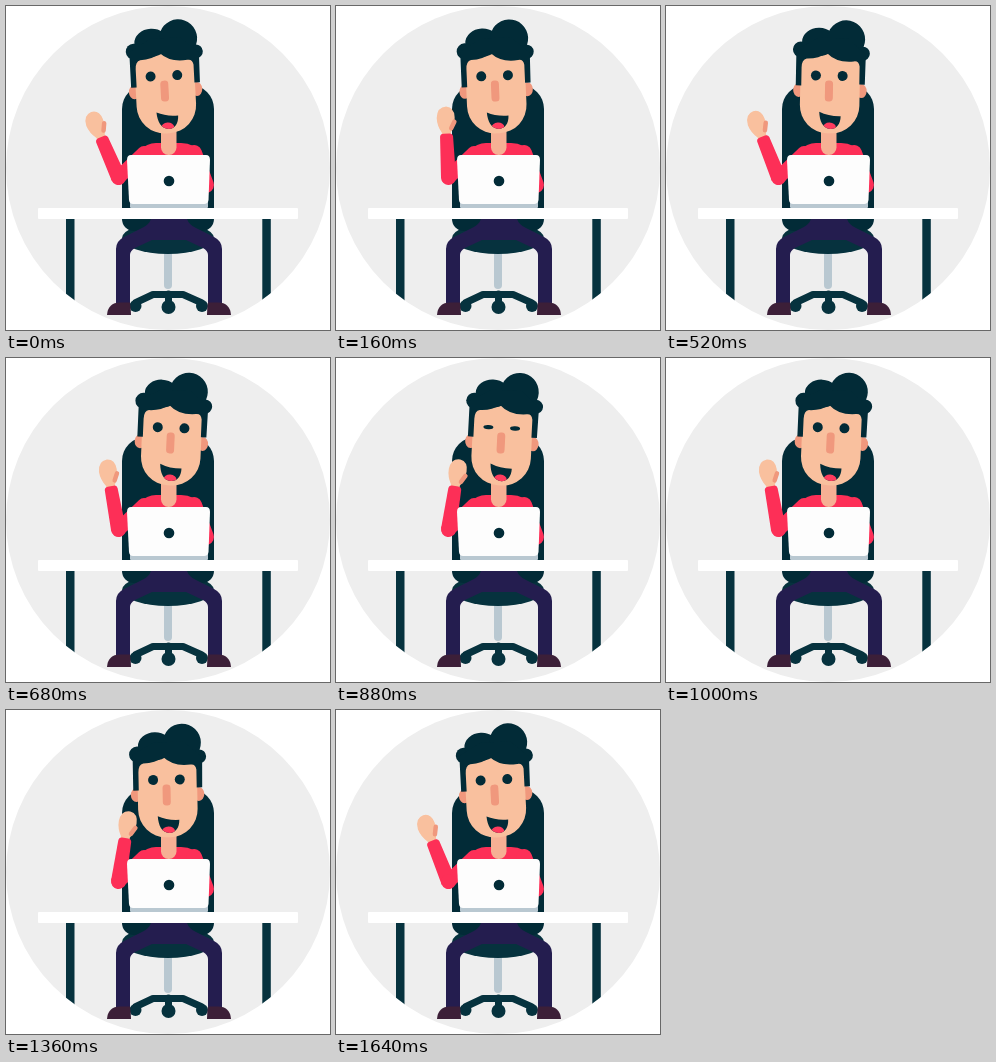
Recreate the animation shown at these times as an HTML page with a canvas. Size 324x324 px, loop 1680 ms.

```html
<!DOCTYPE html>
<html lang="en">
<head>
<meta charset="utf-8">
<title>Waving at the desk</title>
<style>
  html, body { margin: 0; width: 100%; height: 100%; overflow: hidden; background: #fff; }
  canvas { display: block; width: 100vw; height: 100vh; }
</style>
</head>
<body>
<canvas id="stage"></canvas>
<script>
const SIZE = 324, LOOP = 1680, STEP = 40, WAVES = 3;
const C = {
  back: '#eeeeee', dark: '#022b37', metal: '#06323e', skin: '#f9c09e', neck: '#f6b094',
  shade: '#f0987d', red: '#fd2f57', pants: '#241d4f', shoe: '#3c1f38', steel: '#b9c8d1',
  shell: '#fdfdfd', white: '#fff', tongue: '#ff3b5e'
};
const canvas = document.getElementById('stage');
const ctx = canvas.getContext('2d');

function resize() {
  const ratio = window.devicePixelRatio || 1;
  canvas.width = Math.round(innerWidth * ratio);
  canvas.height = Math.round(innerHeight * ratio);
}

function shape(path, color) {
  ctx.fillStyle = color;
  ctx.fill(new Path2D(path));
}

function box(x, y, w, h, r, color) {
  ctx.fillStyle = color;
  ctx.beginPath();
  ctx.roundRect(x, y, w, h, r);
  ctx.fill();
}

function oval(x, y, rx, ry, color) {
  ctx.fillStyle = color;
  ctx.beginPath();
  ctx.ellipse(x, y, rx, ry, 0, 0, Math.PI * 2);
  ctx.fill();
}

function line(path, width, color) {
  ctx.strokeStyle = color;
  ctx.lineWidth = width;
  ctx.lineCap = ctx.lineJoin = 'round';
  ctx.stroke(new Path2D(path));
}

function rotated(x, y, degrees, draw) {
  ctx.save();
  ctx.translate(x, y);
  ctx.rotate(degrees * Math.PI / 180);
  draw();
  ctx.restore();
}

// Eased 0 -> 1 -> 0 over one turn
const swing = turn => (1 - Math.cos(turn * Math.PI * 2)) / 2;

function drawChair() {
  line('M130 296.5L147 288.5H177L195 296.5M162.5 288V300', 7, C.metal);
  oval(129.5, 300, 6, 6, C.metal);
  oval(162.5, 301, 7, 7, C.metal);
  oval(196, 300, 6, 6, C.metal);
  box(158, 240, 8, 43, 4, C.steel);
  oval(162, 232, 46, 16, C.metal);
  box(116, 79, 92, 146, [24, 24, 12, 12], C.dark);
}

function drawLegs() {
  const leg = 'M164 213H145Q143 219 136 222L118 231Q110 235 110 243V298H124V249Q124 245 129 242L146 234H164Z';
  const shoe = 'M101 309Q102 296.5 114 296.5H124Q125 302 125 309Z';
  for (const side of [1, -1]) {
    ctx.save();
    if (side < 0) {
      ctx.translate(326, 0);
      ctx.scale(-1, 1);
    }
    shape(leg, C.pants);
    shape(shoe, C.shoe);
    ctx.restore();
  }
}

function drawTorso() {
  shape('M155 137H150Q141 137 133 145L128 151V198H200V160L196 149Q189 137 175 137Z', C.red);
  line('M112.5 171.5L138 147', 14, C.red);
  line('M188 147L200 179', 16, C.red);
  box(155, 118, 15.5, 31, 7.5, C.neck);
}

function drawForearm(angle) {
  rotated(112.5, 171.5, angle, () => {
    shape('M-4.5 -38V-45Q-9 -52 -9 -60Q-8 -71 1 -71Q9 -70 9 -60Q9 -52 4.5 -45V-38Z', C.skin);
    line('M8.5 -55.5L5 -49', 4.5, C.shade);
    shape('M-7.5 0L-6.5 -41Q-6 -44 -3 -44H3Q6 -44 6.5 -41L7.5 0Z', C.red);
    oval(0, 0, 7.5, 7.5, C.red);
  });
}

function drawHair() {
  oval(133, 44, 8, 8, C.dark);
  oval(151, 36, 17, 14, C.dark);
  oval(178, 33, 19, 19, C.dark);
  oval(195, 47, 7, 7, C.dark);
  shape('M128.5 80V44L150 32H180L198 48L197.5 78H192V60Q191 54 186 55Q169 57 159 47Q151 53 139 53Q134 54 134 62V80Z', C.dark);
}

function drawFace(eyeOpen) {
  oval(131.5, 84.5, 5.5, 7, C.shade);
  oval(194, 84.5, 5.5, 7, C.shade);
  box(133, 40, 59.5, 87.3, [8, 8, 28, 28], C.skin);
  drawHair();
  box(157.8, 74.5, 8, 21, 3.5, C.shade);
  oval(148.5, 69.7, 5, 5 * eyeOpen, C.dark);
  oval(175.2, 69.7, 5, 5 * eyeOpen, C.dark);

  const mouth = new Path2D('M152.5 106Q162 110.5 174 110C174 118 170 123 164 123C156 122.5 153 115 152.5 106Z');
  ctx.fillStyle = C.dark;
  ctx.fill(mouth);
  ctx.save();
  ctx.clip(mouth);
  oval(163, 121.5, 6.5, 5, C.tongue);
  ctx.restore();
}

function drawHead(angle, eyeOpen) {
  rotated(162, 145, angle, () => {
    ctx.translate(-162, -145);
    drawFace(eyeOpen);
  });
}

function drawDesk() {
  box(124, 194, 78, 8, 1, C.steel);
  shape('M125 149H200Q204 149 204 154L202.5 194Q202 198 198 198H127Q123.5 198 123 194L121 154Q121 149 125 149Z', C.shell);
  oval(163, 175, 5.3, 5.3, C.dark);
  box(60, 212, 8.5, 90, 0, C.metal);
  box(256.3, 212, 8.5, 90, 0, C.metal);
  box(32, 202, 260, 11, 1, C.white);
}

function draw(time) {
  const turn = time / LOOP;
  const blink = Math.max(0, 1 - Math.abs(time - 840) / 120);
  ctx.setTransform(canvas.width / SIZE, 0, 0, canvas.height / SIZE, 0, 0);
  ctx.fillStyle = C.white;
  ctx.fillRect(0, 0, SIZE, SIZE);
  ctx.save();
  ctx.beginPath();
  ctx.arc(162, 162, 162, 0, Math.PI * 2);
  ctx.clip();
  ctx.fillStyle = C.back;
  ctx.fillRect(0, 0, SIZE, SIZE);
  drawChair();
  drawLegs();
  drawTorso();
  drawForearm(-23.5 + 34 * swing(turn * WAVES));
  drawHead(-3 + 6 * swing(turn), 1 - 0.85 * blink);
  drawDesk();
  ctx.restore();
}

function frame() {
  const time = performance.now() % LOOP;
  draw(Math.floor(time / STEP) * STEP);
  requestAnimationFrame(frame);
}

addEventListener('resize', resize);
resize();
frame();
</script>
</body>
</html>
```
